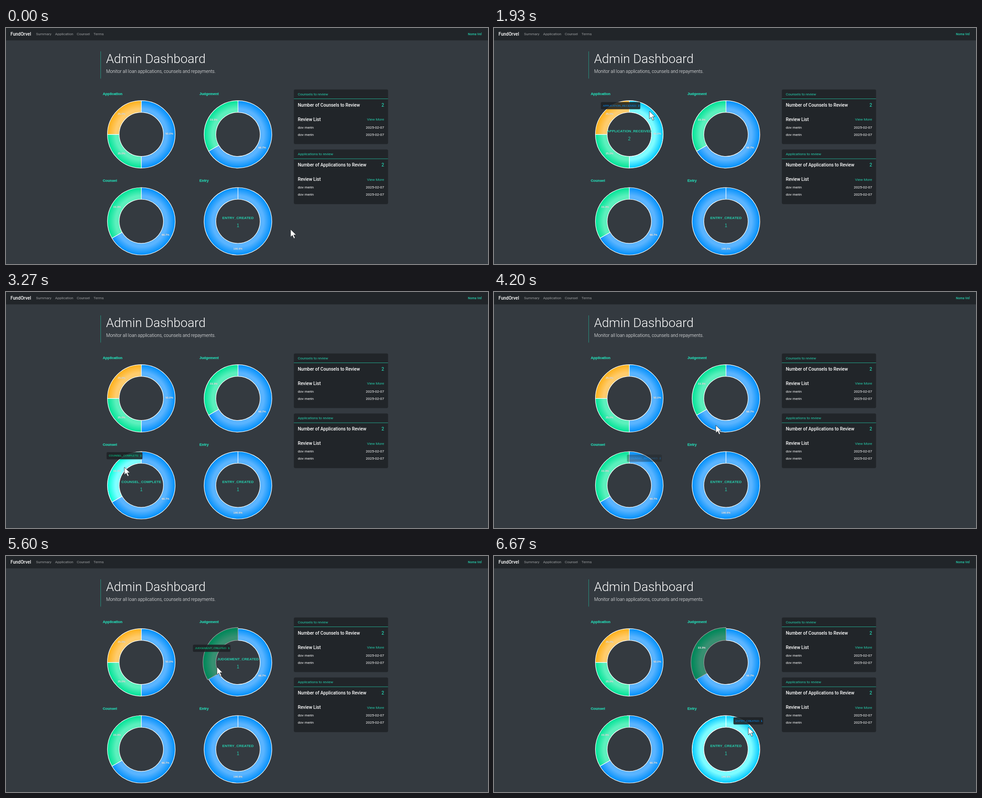
Recreate the animation shown at these times as an HTML page. Size 1067 px wide and 525 px high, loop 7270 ms.

```html
<!DOCTYPE html>
<html lang="en">
<head>
<meta charset="utf-8">
<title>Admin Dashboard</title>
<style>
  html, body { margin: 0; width: 100%; height: 100%; overflow: hidden; background: #343a40; }
  svg { display: block; width: 1067px; height: 525px; }
  text { font: 400 8px Roboto, sans-serif; fill: #fff; white-space: pre; }
  .teal { fill: #26d0ae; }
  .nav { fill: #9b9d9f; }
  .mid { font-weight: 500; }
  .big { font-size: 10px; font-weight: 500; }
  .end { text-anchor: end; }
  .title, .name, .value, .pct, .tip { font-family: "Liberation Sans", Arial, sans-serif; }
  .title { font-weight: 700; stroke: #26d0ae; stroke-width: .3px; }
  .name { font-weight: 700; text-anchor: middle; }
  .value { font-size: 10px; text-anchor: middle; }
  .pct { font-size: 6px; font-weight: 700; text-anchor: middle; filter: drop-shadow(.5px .5px .5px rgba(0,0,0,.5)); }
  .tip { font-size: 6px; fill: inherit; }
  .slice { stroke: #fff; stroke-width: 1.2px; stroke-linejoin: round; }
</style>
</head>
<body>
<svg id="stage" viewBox="0 0 1067 525" xmlns="http://www.w3.org/2000/svg"></svg>
<script>
const LOOP = 7270, STEP = 200 / 3, TIP_LAG = 130, FADE = 120;
const R_OUT = 75, R_IN = 49, CLICK = 5400;
const stage = document.getElementById('stage');

function add(parent, tag, attrs, content) {
  const node = document.createElementNS('http://www.w3.org/2000/svg', tag);
  for (const key in attrs) node.setAttribute(key, attrs[key]);
  if (content !== undefined) node.textContent = content;
  parent.append(node);
  return node;
}
const label = (parent, x, y, cls, content) => add(parent, 'text', { x, y, class: cls }, content);

const palette = {
  blue: ['#5ab4ff', '#008ffb'],
  green: ['#5cf0bd', '#00e396'],
  amber: ['#ffcc6d', '#feb019']
};
const defs = add(stage, 'defs', {});
for (const hue in palette) {
  const grad = add(defs, 'radialGradient', { id: hue, gradientUnits: 'userSpaceOnUse', cx: 0, cy: 0, r: R_OUT });
  add(grad, 'stop', { offset: .76, 'stop-color': palette[hue][0] });
  add(grad, 'stop', { offset: 1, 'stop-color': palette[hue][1] });
}

// Navbar and page header
add(stage, 'rect', { width: 1067, height: 525, fill: '#343a40' });
add(stage, 'rect', { width: 1067, height: 27.5, fill: '#212529' });
label(stage, 10, 17, 'big', 'FundOrvel');
[[66.5, 'Summary'], [108.7, 'Application'], [156.7, 'Counsel'], [193.8, 'Terms']]
  .forEach(([x, name]) => label(stage, x, 16.3, 'nav', name));
label(stage, 1053, 16.2, 'teal mid end', 'Noma Vel').style.fontSize = '7px';
add(stage, 'rect', { x: 209.3, y: 52, width: .8, height: 60.5, fill: '#26d0ae', opacity: .75 });
const heading = label(stage, 221.5, 78.3, '', 'Admin Dashboard');
heading.style.cssText = 'font-size:28px;font-weight:300';
const lead = label(stage, 221.8, 100, '', 'Monitor all loan applications, counsels and repayments.');
lead.style.cssText = 'font-size:10px;font-weight:300';

// Review cards
function card(y, kind) {
  const g = add(stage, 'g', { transform: `translate(637 ${y})` });
  add(g, 'rect', { x: .25, width: 208.5, height: 121.5, rx: 3, fill: '#212529' });
  add(g, 'rect', { x: .25, y: 20.2, width: 208.5, height: .9, fill: '#26d0ae', opacity: .85 });
  label(g, 9, 12.9, 'teal', kind + ' to review');
  label(g, 9, 37.8, 'big', `Number of ${kind} to Review`);
  label(g, 200, 37.8, 'big teal end', '2');
  label(g, 9, 70.2, 'big', 'Review List');
  label(g, 200, 69.5, 'teal end', 'View More');
  for (const row of [87.2, 103.1]) {
    label(g, 9, row, '', 'dov merin');
    label(g, 200, row, 'end', '2025-02-07');
  }
}
card(136.8, 'Counsels');
card(270.3, 'Applications');

// Donut charts
function ringPath(from, to, outer) {
  const at = (turn, r) => {
    const a = turn * 2 * Math.PI;
    return `${(Math.sin(a) * r).toFixed(3)} ${(-Math.cos(a) * r).toFixed(3)}`;
  };
  const large = to - from > .5 ? 1 : 0;
  return `M${at(from, outer)}A${outer} ${outer} 0 ${large} 1 ${at(to, outer)}` +
    `L${at(to, R_IN)}A${R_IN} ${R_IN} 0 ${large} 0 ${at(from, R_IN)}Z`;
}

function donut(cx, cy, title, parts) {
  label(stage, cx - 85.3, cy - 87.6, 'title teal', title);
  const g = add(stage, 'g', { transform: `translate(${cx} ${cy})` });
  const total = parts.reduce((sum, part) => sum + part[2], 0);
  let start = 0;
  const slices = parts.map(([name, hue, count]) => {
    const from = start, share = count / total;
    const to = Math.min(from + share, from + .99999);
    start += share;
    const path = add(g, 'path', { class: 'slice', d: ringPath(from, to, R_OUT), fill: `url(#${hue})` });
    return { name, hue, count, share, from, to, path };
  });
  for (const s of slices) {
    const a = (s.from + s.to) * Math.PI;
    label(g, Math.sin(a) * 62, -Math.cos(a) * 62 + .6, 'pct', (s.share * 100).toFixed(1) + '%');
  }
  const name = label(g, 0, -4.7, 'name teal', '');
  const value = label(g, 0, 13, 'value teal', '');
  return { slices, name, value };
}

const charts = [
  donut(299.5, 236.6, 'Application', [
    ['APPLICATION_RECEIVED', 'blue', 2],
    ['APPLICATION_APPROVED', 'green', 1],
    ['APPLICATION_GRANT_UPDATED', 'amber', 1]]),
  donut(513.5, 236.6, 'Judgement', [
    ['JUDGEMENT_RECEIVED', 'blue', 2],
    ['JUDGEMENT_CREATED', 'green', 1]]),
  donut(299.5, 430, 'Counsel', [
    ['COUNSEL_RECEIVED', 'blue', 2],
    ['COUNSEL_COMPLETE', 'green', 1]]),
  donut(513.5, 430, 'Entry', [['ENTRY_CREATED', 'blue', 1]])
];
const picked = charts[1].slices[1];

// Tooltip and pointer
const tip = add(stage, 'g', {});
const tipBox = add(tip, 'rect', { height: 16, rx: 2.5, fill: '#1e2225', 'fill-opacity': .88 });
const tipText = label(tip, 4.7, 10.1, 'tip', '');
const tipName = add(tipText, 'tspan', {});
const tipCount = add(tipText, 'tspan', { dx: 2.5, 'font-weight': 700 });
const pointer = add(stage, 'path', {
  d: 'M0 0V17L4 13.3L7.3 20.3L10 19L6.9 12.3H12.4Z',
  fill: '#fff', stroke: '#22262a', 'stroke-width': .8, 'stroke-linejoin': 'round'
});

// time, x, y
const route = [
  [267, 630, 448], [467, 590, 418], [667, 480, 325], [800, 374, 249], [933, 257, 192],
  [1533, 257, 192], [1803, 280, 187], [1930, 344, 185],
  [2267, 344, 185], [2400, 361, 215], [2533, 318, 277], [2667, 231, 249],
  [2967, 231, 249], [3140, 263, 381], [3270, 262, 390], [3470, 268, 400], [3600, 278, 396],
  [3730, 330, 386], [4000, 333, 384], [4067, 345, 375], [4200, 491, 296.5], [4270, 497, 294],
  [4467, 497, 294], [4800, 558, 264], [5070, 500, 230], [5200, 455, 219],
  [5467, 455, 219], [5600, 467, 247], [5800, 466, 335], [5930, 475, 373], [6000, 482, 375], [6530, 563, 381]
];
// chart, slice, start, end
const hovers = [
  [0, 2, 870, 1800], [0, 0, 1800, 2567], [0, 1, 2567, 3067],
  [2, 1, 3140, 3700], [2, 0, 3700, 4130],
  [1, 0, 4260, 5130], [1, 1, 5130, 5660],
  [3, 0, 5920, LOOP]
];

function pointerAt(t) {
  const i = route.findIndex(key => key[0] > t);
  if (i === 0) return route[0].slice(1);
  if (i < 0) return route[route.length - 1].slice(1);
  const [t0, x0, y0] = route[i - 1], [t1, x1, y1] = route[i];
  const p = (t - t0) / (t1 - t0);
  return [x0 + (x1 - x0) * p, y0 + (y1 - y0) * p];
}

function drawTip(t, index) {
  if (index < 0) return tip.setAttribute('opacity', 0);
  const [c, s, start, end] = hovers[index];
  const slice = charts[c].slices[s], before = hovers[index - 1];
  const joined = before && before[0] === c && before[3] === start;
  const shown = joined ? 1 : Math.min(1, (t - start) / FADE);
  const opacity = t < end ? shown : Math.max(0, 1 - (t - end) / FADE);
  const [x, y] = pointerAt(Math.min(t, end) - TIP_LAG);
  tipName.textContent = slice.name + ':';
  tipCount.textContent = slice.count;
  tipText.style.fill = palette[slice.hue][1];
  const width = tipText.getComputedTextLength() + 9;
  tipBox.setAttribute('width', width);
  tip.setAttribute('transform', `translate(${x - width / 2} ${y - 22.3})`);
  tip.setAttribute('opacity', opacity);
}

function draw(time) {
  const t = Math.floor((time + 5) / STEP) * STEP;
  let index = -1;
  hovers.forEach((h, i) => { if (t >= h[2]) index = i; });
  const active = index >= 0 && t < hovers[index][3] ? hovers[index] : null;
  const hovered = active && charts[active[0]].slices[active[1]];
  const clicked = t >= CLICK;

  for (const chart of charts) {
    for (const s of chart.slices) {
      const dark = s === picked && clicked;
      s.path.style.filter = dark ? 'brightness(.6)' : s === hovered ? 'brightness(1.4)' : 'none';
    }
    const focus = chart.slices.length === 1 ? chart.slices[0] : chart.slices.find(s => s === hovered);
    chart.name.textContent = focus ? focus.name : '';
    chart.value.textContent = focus ? focus.count : '';
  }
  picked.path.setAttribute('d', ringPath(picked.from, picked.to, clicked ? 77.5 : R_OUT));
  drawTip(t, index);
  pointer.setAttribute('transform', `translate(${pointerAt(t).join(' ')})`);
}

const begin = performance.now();
function tick() {
  draw((performance.now() - begin) % LOOP);
  requestAnimationFrame(tick);
}
tick();
</script>
</body>
</html>
```
